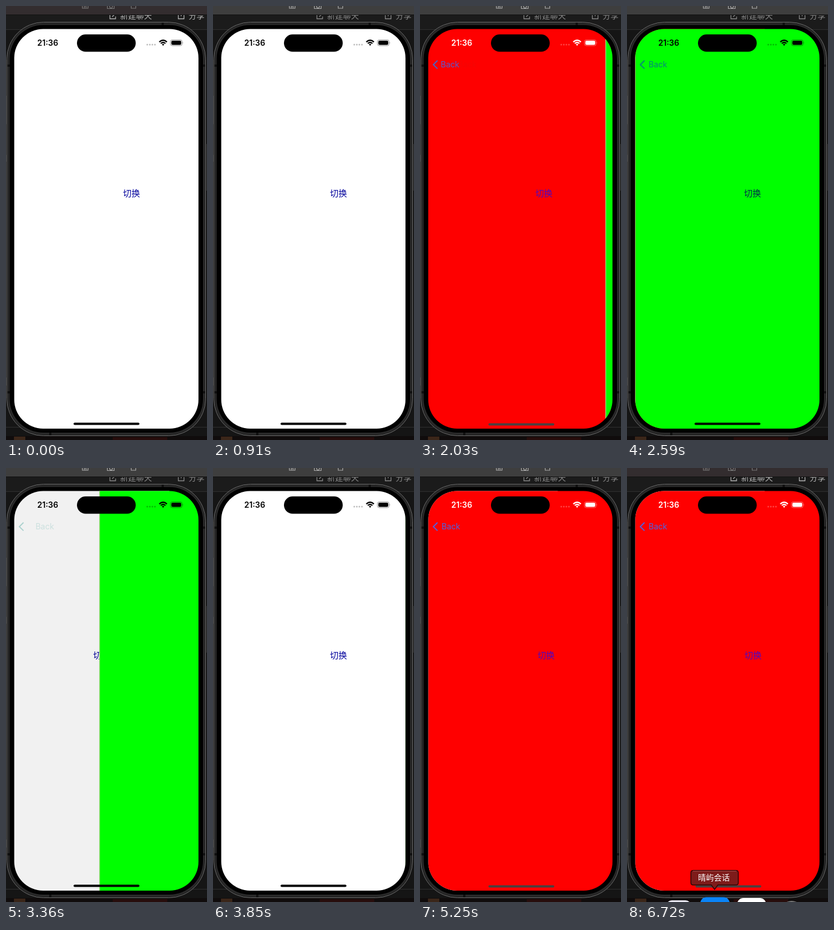
An HTML page for the animation above (6790 ms loop, 354x764 px).

```html
<!DOCTYPE html>
<html lang="zh-CN">
<head>
<meta charset="utf-8">
<title>Navigation stack</title>
<style>
  html, body { margin: 0; width: 100%; height: 100%; overflow: hidden; background: #161616; }
  svg { display: block; width: 354px; height: 764px; }
  text { font-family: Inter, "Noto Sans CJK SC", "Noto Sans CJK", sans-serif; font-size: 14px; }
  .cjk { font-family: "Noto Sans CJK SC", "Noto Sans CJK", sans-serif; }
  .switch { font-size: 15px; }
</style>
</head>
<body>
<svg viewBox="0 0 354 764">
  <defs>
    <clipPath id="clip"><rect x="14.5" y="40.5" width="324.5" height="703.5" rx="51"/></clipPath>
  </defs>

  <!-- desktop behind the phone -->
  <rect width="354" height="764" fill="#151515"/>
  <rect y="16" width="354" height="25" fill="#1b1b1b"/>
  <path d="M0 41.500H354M0 741.500H354" stroke="#303030"/>
  <path d="M0 158v50M0 262v12M0 654v14M353.500 243v82" stroke="#3a3a3a"/>
  <rect y="757" width="354" height="7" fill="#100c0c"/>
  <rect x="14" y="758" width="20" height="6" fill="#3b2619"/>
  <rect x="188" y="759" width="96" height="5" fill="#270d0c"/>
  <g id="toolbar" fill="#b4b4b4" stroke="#b4b4b4">
    <g fill="none" stroke-width="1.300">
      <path d="M185 13h-2v9.500h10v-4M187 19l8-8"/>
      <path d="M305 13h-1.500v9.500h10V13H312M308.500 10v8"/>
    </g>
    <g stroke="none" font-weight="500">
      <text class="cjk" x="201" y="21.500">新建聊天</text>
      <text class="cjk" x="321.500" y="21.500">分享</text>
    </g>
  </g>
  <rect id="titlebar" width="354" height="15.500" fill="#332d2f"/>
  <path d="M0 15.500H354" stroke="#111"/>
  <g id="tools" fill="none" stroke="#777" stroke-width="1.200">
    <path d="M134.500 0v4h10V0M138 4V0h3v4M178.500 0v4.500h12V0M220.500 0v4h8V0"/>
    <circle cx="185" cy="1" r="2.500"/>
  </g>

  <!-- phone body -->
  <rect x="1.500" y="28.500" width="350" height="728" rx="65" fill="#292929" stroke="#6c6c6c"/>
  <rect x="3" y="30" width="347" height="725" rx="63" fill="none" stroke="#1c1c1c"/>
  <path d="M2 105h5M2 680h5M346 105h5M346 680h5M276 29v5M78 751v5" stroke="#111" stroke-width="4"/>
  <rect x="6.500" y="33.500" width="340.500" height="717.500" rx="59" fill="#000"/>

  <g clip-path="url(#clip)">
    <g id="pages"></g>
    <g id="backs"></g>
    <g id="status">
      <text x="55" y="69.800" font-weight="600">21:36</text>
      <g opacity=".25">
        <circle cx="248.800" cy="68" r="1.500"/><circle cx="253.300" cy="68" r="1.500"/>
        <circle cx="257.800" cy="68" r="1.500"/><circle cx="262.300" cy="68" r="1.500"/>
      </g>
      <g fill="none" stroke="currentColor" stroke-width="2.300">
        <path d="M270 63.300Q276.700 57.300 283.400 63.300M272.600 66Q276.700 62.500 280.800 66"/>
      </g>
      <path d="M274.500 67.600Q276.700 66 278.900 67.600L276.700 70Z"/>
      <rect x="289.500" y="59.500" width="20.800" height="10.500" rx="3.500" fill="none" stroke="currentColor" opacity=".4"/>
      <rect x="291.200" y="61" width="17.400" height="7.400" rx="2.200"/>
      <path d="M311.300 63.200q1.600 1.500 0 3.200Z" opacity=".5"/>
    </g>
    <rect x="125" y="50" width="103.500" height="30.500" rx="15.250"/>
    <rect id="home" y="733.500" width="116" height="4" rx="2"/>
  </g>

  <!-- dock and its label -->
  <g id="dock">
    <rect class="icon" width="44" height="44" rx="10" fill="#e4e4ee"/>
    <rect class="icon" width="52" height="52" rx="11" fill="#0a84f8"/>
    <rect class="icon" width="51" height="51" rx="11" fill="#fff"/>
    <rect class="icon" width="40" height="40" rx="20" fill="#777"/>
  </g>
  <g id="tip">
    <path d="M116.500 708.500H192q4 0 4 4V730q0 4-4 4H160L154.300 742L148.500 734H116.500q-4 0-4-4V712.500q0-4 4-4Z"
      fill="#7e1b1a" stroke="#2a0706" stroke-width="1.500"/>
    <path d="M116 709.700H192.500" stroke="#a55"/>
    <text class="cjk" x="125" y="726" fill="#fff">晴屿会话</text>
  </g>
</svg>

<script>
const LOOP = 6790, STEP = 70, LEFT = 14, WIDTH = 325, OMEGA = 17.95, SETTLE = 650;
const $ = id => document.getElementById(id);
const clamp = v => Math.max(0, Math.min(1, v));
const mix = (a, b, k) => a + (b - a) * k;
const set = (el, attrs) => { for (const k in attrs) el.setAttribute(k, attrs[k]); };

function make(parent, tag, attrs, text) {
  const el = document.createElementNS("http://www.w3.org/2000/svg", tag);
  set(el, attrs);
  if (text) el.textContent = text;
  return parent.appendChild(el);
}

function page(fill, edge, ink, bar, home, tint) {
  const box = make($("pages"), "g", {});
  make(box, "rect", { x: LEFT, y: 40, width: WIDTH + 1, height: 705, fill });
  if (edge) make(box, "rect", { x: LEFT, y: 40, width: 1, height: 705, fill: edge });
  make(box, "text", { x: 206 + (bar ? 1 : 0), y: 335, fill: ink, class: "cjk switch" }, "切换");
  const dim = make(box, "rect", { x: LEFT, y: 40, width: WIDTH + 1, height: 705 });
  let back = null, label = null;
  if (tint) {
    back = make($("backs"), "g", {});
    make(back, "path", { d: "M30.800 96L23.500 103.200L30.800 110.400", fill: "none", stroke: tint, "stroke-width": 1.9 });
    label = make(back, "text", { x: 38, y: 108.200, fill: tint }, "Back");
  }
  return { box, dim, back, label, bar, home };
}

// bar: status bar ink, 0 black to 255 white
const white = page("#fff", null, "#00009c", 0, "#000", null);
const red = page("#f00", "#5a3030", "#4c08c4", 255, "#4a4040", "#4c62e4");
const green = page("#0f0", "#d8c8b0", "#00284e", 0, "#000", "#04877c");
const all = [white, red, green];

const moves = [
  { at: -SETTLE, from: red, to: white, push: false },
  { at: 1037, from: white, to: red, push: true },
  { at: 2013, from: red, to: green, push: true },
  { at: 3273, from: green, to: white, push: false },
  { at: 4673, from: white, to: red, push: true }
];

// critically damped spring: the part of the way still to go
function spring(ms) {
  if (ms >= SETTLE) return 0;
  const k = OMEGA * ms / 1000;
  return (1 + k) * Math.exp(-k);
}

function place(p, x, dim) {
  set(p.box, { transform: `translate(${x.toFixed(2)} 0)`, display: "inline" });
  set(p.dim, { opacity: dim });
}

function showBack(p, shift, alpha, arrow) {
  if (!p.back) return;
  set(p.back, { display: "inline", opacity: arrow });
  set(p.label, { x: 38 + shift, opacity: alpha });
}

function drawPhone(t) {
  const { at, from, to, push } = moves.filter(m => m.at <= t).pop();
  const rest = spring(t - at), done = 1 - rest;
  const top = push ? to : from, under = push ? from : to;
  const open = push ? rest : done;
  const cover = 1 - open;

  for (const p of all) {
    set(p.box, { display: "none" });
    if (p.back) set(p.back, { display: "none" });
  }
  place(under, -0.3 * WIDTH * cover, 0.1 * cover);
  place(top, WIDTH * open, 0);
  $("pages").append(under.box, top.box);

  if (rest > 0) showBack(from, (push ? -40 : 30) * done, rest, push && to.back ? rest : rest * rest);
  showBack(to, 30 * rest, Math.sqrt(done), Math.sqrt(done));

  const shade = Math.round(mix(from.bar, to.bar, clamp((t - at - 180) / 140)));
  const ink = `rgb(${shade},${shade},${shade})`;
  set($("status"), { fill: ink, color: ink });

  const seen = WIDTH * open < 163 ? top : under;
  set($("home"), { fill: seen.home, x: seen === red ? 120.5 : 119, y: seen === red ? 734.5 : 733.5 });
}

const icons = [...document.querySelectorAll(".icon")];
const slots = [[69, 761], [129, 755.5], [194, 757], [270, 762]];

function drawDesktop(t) {
  const active = t >= 910 && t < 6720;
  set($("titlebar"), { fill: active ? "#3e3e3e" : "#332d2f" });
  set($("tools"), { stroke: active ? "#aaa" : "#777" });
  set($("toolbar"), { opacity: active ? 0.72 : 1 });

  const rise = 1 - clamp((t - 5740) / 490);
  const grow = clamp((t - 6300) / 280);
  set($("dock"), { display: t >= 5810 ? "inline" : "none" });
  icons.forEach((icon, i) => {
    const [x, y] = slots[i];
    set(icon, { x, y: mix(Math.max(y, 762), y, grow) + 12 * rise * rise });
  });
  set($("tip"), { display: t >= 6370 ? "inline" : "none" });
}

const start = performance.now();
function tick() {
  const now = (performance.now() - start) % LOOP;
  const t = Math.floor(now / STEP) * STEP;
  drawPhone(t);
  drawDesktop(t);
  requestAnimationFrame(tick);
}
tick();
</script>
</body>
</html>
```
